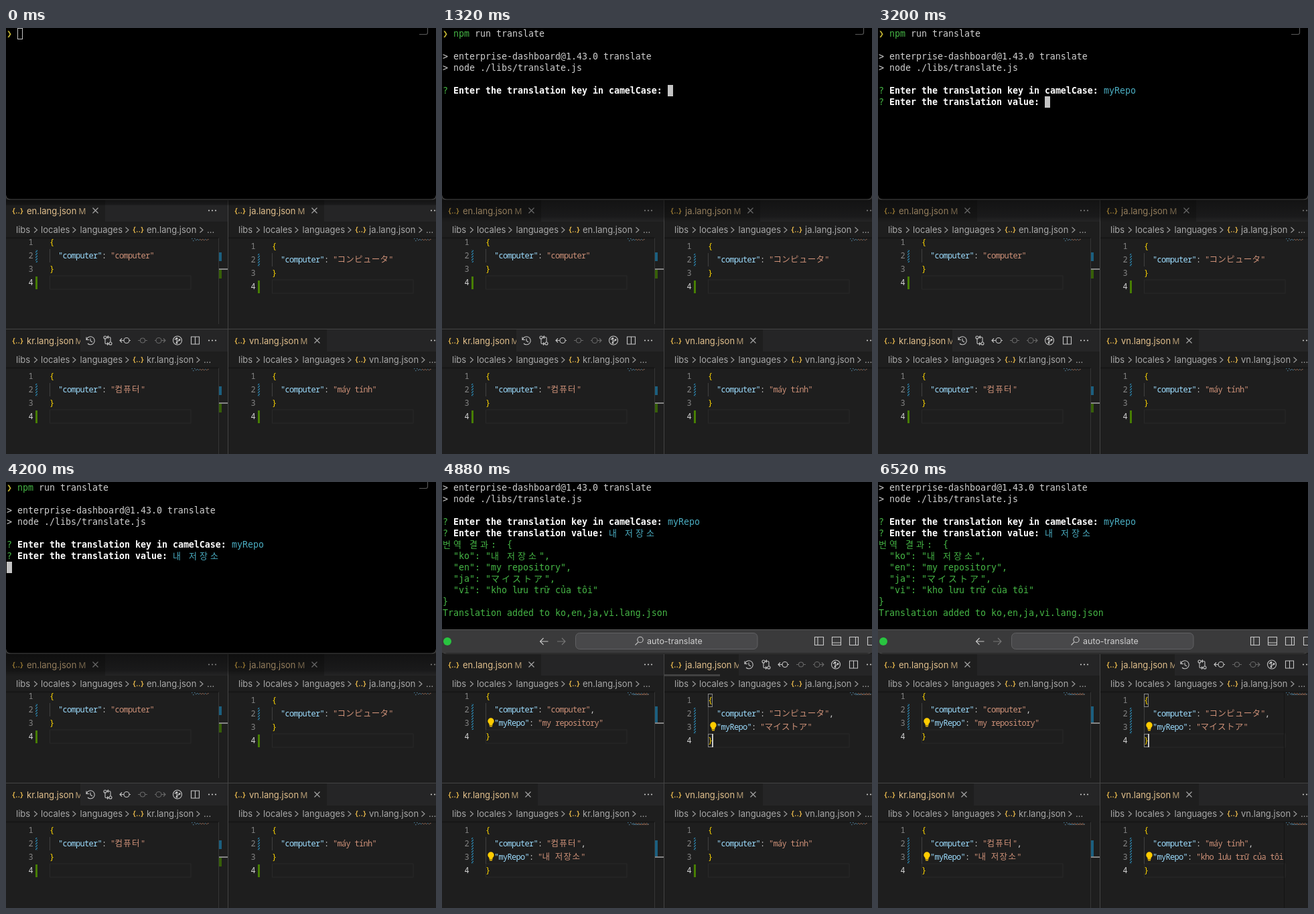
An HTML page that plays this animation: 642x636 px, repeating every 6680 ms.

```html
<!DOCTYPE html>
<html lang="en">
<head>
<meta charset="utf-8">
<title>Auto translate</title>
<style>
html, body { margin: 0; width: 100%; height: 100%; overflow: hidden; background: #1e1e1e; }
svg { display: block; }
text { white-space: pre; }
.ui { font: 13px Inter, "Open Sans", sans-serif; }
.term { font: 13.29px "DejaVu Sans Mono", monospace; }
.code { font: 12px "Noto Sans Mono", "DejaVu Sans Mono", monospace; letter-spacing: -.7px; }
.term .wide { font: 13px "Noto Sans CJK KR", "Noto Sans CJK JP", "Noto Sans CJK", sans-serif; }
.code .wide { font: 12.5px "Noto Sans CJK KR", "Noto Sans CJK JP", "Noto Sans CJK", sans-serif; letter-spacing: 0; }
.bold { font-weight: 700; }
.json { font: 600 11px Inter, sans-serif; fill: #e8b84a; }
.line { fill: none; stroke-width: 1.1; }
</style>
</head>
<body>
<svg id="stage" width="642" height="636" viewBox="0 0 642 636">
  <defs>
    <pattern id="hatch" width="4" height="4" patternUnits="userSpaceOnUse">
      <path d="M-1 1L1 -1M0 4L4 0M3 5L5 3" stroke="#2b8fbd" stroke-width="1.2"/>
    </pattern>
    <linearGradient id="shade" x2="0" y2="1">
      <stop stop-color="#000" stop-opacity=".5"/>
      <stop offset=".75" stop-color="#000" stop-opacity=".3"/>
      <stop offset="1" stop-color="#000" stop-opacity="0"/>
    </linearGradient>
  </defs>
  <g id="scene"></g>
</svg>
<script>
const LOOP = 6680;
const T = {
  focus: 40, enter: 1000, run: 1200, ask: 1280, value: 3200,
  submit: 4200, result: 4440, done: 4520, front: 4640, saved: 4680, savedVn: 4960
};
const C = {
  text: '#cfcfcf', white: '#ffffff', green: '#45b545', cyan: '#4aacc0', prompt: '#c3b433',
  key: '#9cdcfe', str: '#ce9178', gold: '#ffd700', punct: '#d4d4d4', tab: '#e2c08d'
};
const WIDE = /[\u1100-\u11ff\u3000-\u30ff\u3130-\u318f\uac00-\ud7af]/;
const clamp = (v, lo, hi) => Math.min(hi, Math.max(lo, v));

const rect = (x, y, w, h, fill, more = '') =>
  `<rect x="${x}" y="${y}" width="${w}" height="${h}" fill="${fill}" ${more}/>`;
const path = (d, color, more = '') => `<path class="line" d="${d}" stroke="${color}" ${more}/>`;
const label = (x, y, s, fill, cls = 'ui', more = '') =>
  `<text class="${cls}" x="${x}" y="${y}" fill="${fill}" ${more}>${s}</text>`;
const chevron = (x, y) => path(`M${x - 2.5} ${y - 4}l4.5 4l-4.5 4`, '#a0a0a0');
const dots = (x, y) => [-5, 0, 5].map(d => `<circle cx="${x + d}" cy="${y}" r="1.1" fill="#c5c5c5"/>`).join('');

// Lays out [colour, text, class] parts on a character grid; wide glyphs take their own cell.
function grid(x, y, parts, cell, wideCell) {
  let out = '';
  for (const [fill, str, cls = ''] of parts) {
    for (const run of str.match(/[\u1100-\u11ff\u3000-\u30ff\u3130-\u318f\uac00-\ud7af]|[^\u1100-\u11ff\u3000-\u30ff\u3130-\u318f\uac00-\ud7af]+/g) || []) {
      const wide = WIDE.test(run);
      const safe = run.replace(/</g, '&lt;').replace(/>/g, '&gt;');
      out += label(x.toFixed(1), y, safe, fill, wide ? 'wide' : cls);
      x += wide ? wideCell : cell * run.length;
    }
  }
  return { out, x };
}

/* Terminal */
const COMPOSE = ['', 'ㄴ', '내', '내 ', '내 ㅈ', '내 저', '내 젖', '내 저자', '내 저장', '내 저장ㅅ', '내 저장소'];

function keyInput(t) {
  if (t < 2360) return 'my-repo'.slice(0, clamp(Math.floor((t - 1360) / 85) + 1, 0, 7));
  if (t < 2480) return 'my-rep';
  if (t < 2800) return 'my-rep'.slice(0, clamp(5 - Math.floor((t - 2480) / 45), 2, 5));
  return 'myRepo'.slice(0, clamp(3 + Math.floor((t - 2800) / 85), 3, 6));
}

function valueInput(t) {
  return COMPOSE[clamp(Math.floor((t - 3480) / 56) + 1, 0, 10)];
}

function termRows(t) {
  const typed = 'npm run translate'.slice(0, clamp(Math.floor((t - 80) / 52) + 1, 0, 17));
  const rows = [[[C.prompt, '❯ '], [C.green, typed.slice(0, 3)], [C.text, typed.slice(3)]]];
  const ask = (q, a, done) => rows.push([[C.green, '? '], [C.white, q + ' ', 'bold'], [done ? C.cyan : C.text, a]]);
  if (t >= T.enter) rows.push([]);
  if (t >= T.run) rows.push(
    [[C.text, '> enterprise-dashboard@1.43.0 translate']],
    [[C.text, '> node ./libs/translate.js']], [], []);
  if (t >= T.ask) {
    rows.pop();
    ask('Enter the translation key in camelCase:', keyInput(t), t >= 3160);
  }
  if (t >= T.value) ask('Enter the translation value:', valueInput(t), t >= T.submit);
  if (t >= T.result) {
    ['번역 결과:  {', '  "ko": "내 저장소",', '  "en": "my repository",', '  "ja": "マイストア",',
      '  "vi": "kho lưu trữ của tôi"', '}', 'Translation added to ko,en,ja,vi.lang.json']
      .forEach(s => rows.push([[C.green, s]]));
  }
  if (t >= T.done) rows.push([], [[C.prompt, '❯ ']]);
  else if (t >= T.submit) rows.push([]);
  return rows;
}

function terminal(t) {
  let end = 1, out = '';
  const rows = termRows(t);
  rows.forEach((parts, i) => {
    const line = grid(1, i * 17 + 13, parts, 8, 16);
    out += line.out;
    end = line.x;
  });
  const top = (rows.length - 1) * 17;
  out += t < T.focus
    ? rect(end + .5, .5, 7, 16, 'none', 'stroke="#c4c4c4"')
    : rect(end, top, 8, 17, '#c4c4c4');
  out += path('M617 9.5H627Q629.5 9.5 629.5 7V0', '#5a5a5a');
  const scroll = t >= T.done ? -34 : 0;
  return rect(0, 248, 642, 9, '#1e1e1e') +
    '<path d="M0 0H642V250Q642 255.5 635 255.5H7Q0 255.5 0 250Z"/>' +
    path('M0 250Q0 256 7 256H635Q642 256 642 250', '#454545') +
    `<g class="term" transform="translate(0 ${scroll})">${out}</g>`;
}

/* Editor window */
function actions() {
  const on = '#c5c5c5', off = '#686868';
  const ring = (r, c) => `<circle class="line" r="${r}" stroke="${c}"/>`;
  const icons = [
    path('M-6 -5V-1H-2M-5.5 -1.5A6 6 0 1 1 -4 4.5M0 -3V.5L3 2.5', on),
    path('M-4 -2.5V4Q-4 5 -2 5H1M-1 3L1 5L-1 7M4 2.5V-4Q4 -5 2 -5H-1M1 -7L-1 -5L1 -3', on) +
      `<g class="line" stroke="${on}"><circle cx="-4" cy="-4.5" r="2"/><circle cx="4" cy="4.5" r="2"/></g>`,
    `<g transform="translate(2 0)">${ring(4, on)}</g>` + path('M-2 0H-8M-5 -3L-8 0L-5 3M6 0H8', on),
    ring(3.5, off) + path('M-7 0H-3.5M3.5 0H7', off),
    `<g transform="translate(-2 0)">${ring(4, off)}</g>` + path('M2 0H8M5 -3L8 0L5 3M-8 0H-6', off),
    ring(6.5, on) + path('M-1 -4V4M-1 1Q3 1 3 -1M-4 -1L-1 -4', on) +
      `<g fill="${on}"><circle cx="-1" cy="-3" r="1.5"/><circle cx="-1" cy="3.5" r="1.5"/><circle cx="3" cy="-1" r="1.5"/></g>`,
    path('M-6 -5.5H6V5.5H-6ZM0 -5.5V5.5', on)
  ];
  return rect(111, 1, 220, 33, '#252526') + icons.map((s, i) =>
    `<g transform="translate(${126 + i * 26 + (i > 5 ? .5 : 0)} 17.5)">${s}</g>`).join('');
}

const bulb = y => `<g transform="translate(73 ${y})"><circle r="4.7" cy="-2" fill="#ffcc00"/>` +
  rect(-2.5, 2, 5, 2.5, '#ffcc00') + rect(-2, 5, 4, 1.5, '#d9ae10') + '</g>';

function minimap(y, saved) {
  let out = '';
  for (let i = 0; i < (saved ? 16 : 13); i++) {
    const color = i % 5 < 1 ? '#3d6f88' : i < 6 ? '#4f7890' : '#8a6350';
    out += rect(277 + i * 2, y + (i < 3 ? i % 2 * 3 : 1 + i % 2), 1.5, 1.2, color);
    if (saved && i > 3) out += rect(277 + i * 2, y + 3, 1.5, 1, i < 9 ? '#4f7890' : '#8a6350');
  }
  return out;
}

function pane(p, t) {
  const saved = t >= p.at, { tab, top } = p;
  const lineY = n => top + (n - 1) * 20;
  const focused = p.name === (t >= T.front ? 'ja' : 'kr');
  const caretPane = p.name === 'ja' && t >= T.front;
  const file = p.name + '.lang.json';

  let out = rect(0, 0, 332, 187, '#1e1e1e') + rect(0, 1, 332, 33, '#252526') + rect(0, 1, tab, 33, '#1e1e1e');
  out += label(9, 22, '{..}', '', 'json') + label(31, 22.5, file, C.tab);
  out += label(tab - 34, 22.5, 'M', C.tab, 'ui', 'text-anchor="middle" opacity=".75" style="font-size:12px"');
  const cx = tab - 14.5;
  if (focused) out += actions();
  else out += path(`M${cx - 4} 13.5l8 8m0 -8l-8 8`, '#a8a8a8');
  out += dots(308, 17.5);
  if (caretPane && t < 5060) out += rect(0, 32, 83, 3, '#797979', `opacity="${clamp((5060 - t) / 160, 0, .4)}"`);

  out += label(15, 51, 'libs', '#a9a9a9') + label(52, 51, 'locales', '#a9a9a9') + label(110.5, 51, 'languages', '#a9a9a9');
  out += [44.5, 102, 181, 144 + tab].map(x => chevron(x, 46.5)).join('');
  out += label(189, 50, '{..}', '', 'json') + label(210, 51, file, '#a9a9a9') + label(152 + tab, 51, '...', '#a9a9a9');

  out += rect(0, 57.5, 317, 2, '#161616') + minimap(59, saved);
  out += rect(65.5, lineY(4) - 10, 210.5, 20, 'none', 'stroke="#292929"');
  out += rect(65, lineY(2) - 10, 1, saved ? 40 : 20, '#404040');
  out += rect(44, lineY(2) - 9, 3, saved ? 39 : 19, 'url(#hatch)');
  if (!saved) out += rect(44, lineY(4) - 9, 3, 19, '#487e02');
  for (let n = 1; n < 5; n++)
    out += `<g class="code">${label(40, lineY(n) + 4, n, n > 3 ? '#d0d0d0' : '#858585', '', 'text-anchor="end"')}</g>`;

  const entry = (k, v, comma) => [[C.key, `"${k}"`], [C.punct, ': '], [C.str, `"${v}"`], [C.punct, comma]];
  const lines = saved
    ? [[[C.gold, '{']], entry('computer', p.word, ','), entry('myRepo', p.repo, ''), [[C.gold, '}']]]
    : [[[C.gold, '{']], entry('computer', p.word, ''), [[C.gold, '}']]];
  const code = lines.map((parts, i) =>
    grid(parts.length > 1 ? 78 : 65, lineY(i + 1) + 4, parts, 6.5, 12.8).out).join('');
  out += `<svg class="code" width="275" height="187">${code}</svg>`;
  if (saved) out += bulb(lineY(3) - 1);

  if (caretPane) {
    out += [1, 4].map(n => rect(65.5, lineY(n) - 9.5, 6, 19, 'none', 'stroke="#888"')).join('');
    if (caretOn(t)) out += rect(71, lineY(4) - 10, 2, 20, '#c8c8c8');
  }
  if (t >= T.savedVn && p.x) out += rect(274, 59, 1, 128, '#141414');

  out += rect(317, 59, 1, 128, '#353535');
  out += rect(318, top + 15, 4, saved ? 25 : 13, '#1b5f80');
  if (!saved) out += rect(318, top + 41, 4, 13, '#375f08');
  out += rect(318, top + 39, 13, 2, '#858585');
  return `<g transform="translate(${p.x} ${p.y})"><svg width="332" height="187">${out}</svg></g>`;
}

const caretOn = t => t < 5040 || (t >= 5340 && t < 5640) || (t >= 5920 && t < 6240) || t >= 6520;

const PANES = [
  { name: 'en', x: 0, y: 255, top: 65, tab: 148, at: T.saved, word: 'computer', repo: 'my repository' },
  { name: 'ja', x: 332, y: 255, top: 71, tab: 143, at: T.saved, word: 'コンピュータ', repo: 'マイストア' },
  { name: 'kr', x: 0, y: 449, top: 71, tab: 143, at: T.saved, word: '컴퓨터', repo: '내 저장소' },
  { name: 'vn', x: 332, y: 449, top: 71, tab: 147, at: T.savedVn, word: 'máy tính', repo: 'kho lưu trữ của tôi' }
];

function titleBar() {
  const ink = '#c8c8c8';
  const layout = (x, d) => path(`M${x - 6.5} 231.5h13v12h-13z` + d, ink);
  return rect(0, 220, 642, 35, '#3a3a3b') + rect(0, 220, 642, 1, '#575757') +
    '<circle cx="8" cy="238" r="6" fill="#29c440"/>' +
    path('M158.5 238H146.5M151.5 233L146.5 238L151.5 243', ink) +
    path('M172 238H184M179 233L184 238L179 243', '#777') +
    rect(199.5, 225.5, 271.5, 24, '#48484a', 'rx="6" stroke="#606062"') +
    '<circle class="line" cx="296" cy="235.5" r="4.2" stroke="#c8c8c8"/>' + path('M293 238.8L288.5 243.5', ink) +
    label(306, 242, 'auto-translate', '#d0d0d0', 'ui', 'style="font-size:12.5px"') +
    layout(563, 'M561 231.5v12') + layout(589, 'M582.5 240h13') + layout(615, 'M617.5 231.5v12') +
    path('M642 231.5H635.5V243.5H642', ink);
}

function draw(t) {
  const front = t >= T.front;
  let out = PANES.map(p => pane(p, t)).join('');
  out += rect(331, 255, 1, 381, '#444') + rect(0, 449, 642, 1, '#444');
  out += terminal(t);
  if (front) out += titleBar();
  else out += rect(0, 256.5, 642, t < T.focus ? 9 : 33, 'url(#shade)');
  return out;
}

const scene = document.getElementById('scene');
let last = '';
function tick(now) {
  const next = draw(now % LOOP);
  if (next !== last) scene.innerHTML = last = next;
  requestAnimationFrame(tick);
}
const start = performance.now();
const frame = () => tickAt(performance.now() - start);
function tickAt(elapsed) {
  const next = draw(elapsed % LOOP);
  if (next !== last) scene.innerHTML = last = next;
  requestAnimationFrame(frame);
}
frame();
</script>
</body>
</html>
```
